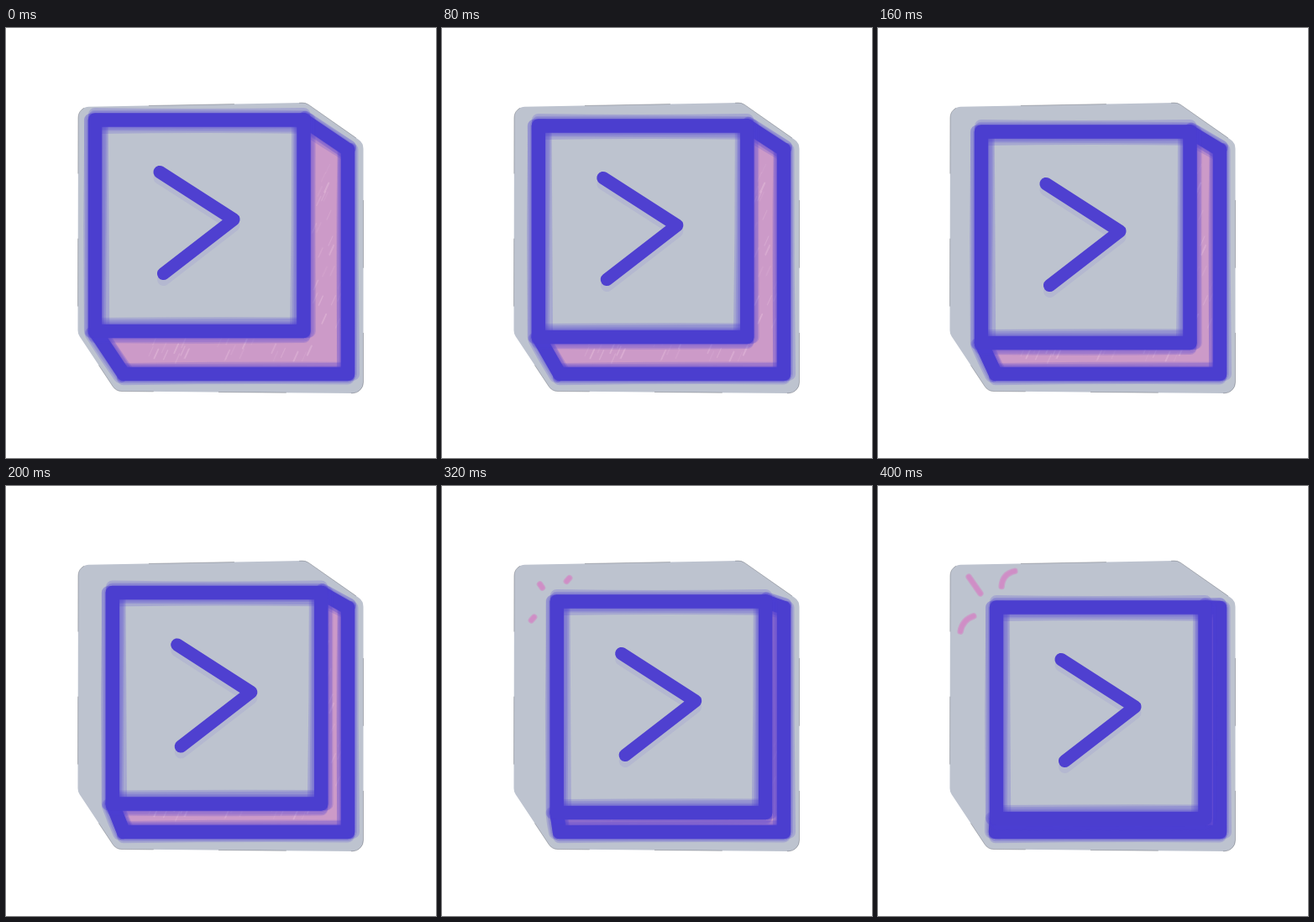
These frames come from a looping animation (512x512 px, 840 ms). An HTML page with a canvas:

```html
<!DOCTYPE html>
<html lang="en">
<head>
<meta charset="utf-8">
<title>Pressed key</title>
<style>
html, body { margin: 0; width: 100%; height: 100%; overflow: hidden; background: #fff; }
canvas { display: block; width: 512px; height: 512px; }
</style>
</head>
<body>
<canvas id="stage" width="512" height="512"></canvas>
<script>
const ctx = document.getElementById('stage').getContext('2d');
const LOOP = 840, STEP = 40, STEPS = 10, TRAVEL = 35;
const INK = '#4b3ecf', GREY = '#bdc3cf', PINK = '#cc9ac8', SPARK = '#d287c5';
const PEN = 16.5;

function seeded(seed) {
  return () => {
    seed = (seed * 16807) % 2147483647;
    return seed / 2147483647;
  };
}

function trace(points, closed) {
  ctx.beginPath();
  points.forEach(p => ctx.lineTo(...p));
  if (closed) ctx.closePath();
}

function traceRounded(points, radius) {
  const [a, b] = points;
  ctx.beginPath();
  ctx.moveTo((a[0] + b[0]) / 2, (a[1] + b[1]) / 2);
  points.forEach((_, i) => {
    const corner = points[(i + 1) % points.length];
    const next = points[(i + 2) % points.length];
    ctx.arcTo(...corner, ...next, radius);
  });
  ctx.closePath();
}

function stroke(color, width, alpha = 1) {
  ctx.globalAlpha = alpha;
  ctx.strokeStyle = color;
  ctx.lineWidth = width;
  ctx.stroke();
  ctx.globalAlpha = 1;
}

function fill(color) {
  ctx.fillStyle = color;
  ctx.fill();
}

// Translucent, uneven brush passes spread across an edge
function feather(a, b, outer, inner, rnd) {
  const dx = b[0] - a[0], dy = b[1] - a[1], len = Math.hypot(dx, dy) || 1;
  const nx = -dy / len, ny = dx / len;
  const passes = 8;
  for (let i = 0; i < passes; i++) {
    const side = outer + (inner - outer) * i / (passes - 1);
    const [from, bow, to] = [0, 1, 2].map(() => side * (0.7 + rnd() * 0.5));
    ctx.beginPath();
    ctx.moveTo(a[0] + nx * from, a[1] + ny * from);
    ctx.quadraticCurveTo((a[0] + b[0]) / 2 + nx * bow, (a[1] + b[1]) / 2 + ny * bow,
      b[0] + nx * to, b[1] + ny * to);
    stroke(INK, 16, 0.2);
  }
}

function drawBase() {
  traceRounded([[86, 94], [357, 89], [425.5, 137], [425.5, 435], [131, 432.5], [85.5, 364]], 13);
  fill(GREY);
  ctx.setLineDash([80, 78]);
  ctx.lineDashOffset = 30;
  stroke('#30343c', 0.6, 0.5);
  ctx.setLineDash([]);
}

function drawPink(side) {
  trace(side, true);
  fill(PINK);
  ctx.save();
  ctx.clip();
  const rnd = seeded(73);
  for (let i = 0; i < 50; i++) {
    const right = i % 2;
    const x = right ? 364 + rnd() * 32 : 170 + rnd() * 190;
    const y = right ? 170 + rnd() * 190 : 376 + rnd() * 24;
    trace([[x, y], [x + 5, y - 11]]);
    stroke('#e3bbd9', 1 + rnd(), 0.15 + 0.4 * rnd() ** 2);
  }
  ctx.restore();
}

function drawKey(px, py) {
  const at = (x, y) => [x + px, y + py];
  const face = [at(106, 109.5), at(354.5, 109.5), at(354.5, 361), at(106, 361)];
  const back = [face[1], [407, 145], [407, 412], [140, 412], face[3]];
  const rnd = seeded(511);

  drawPink([...back, face[2]]);
  back.slice(1).forEach((p, i) => feather(back[i], p, -5, 6, rnd));
  trace(back);
  stroke(INK, PEN);

  trace(face, true);
  fill(GREY);
  face.forEach((p, i) => feather(p, face[(i + 1) % 4], -6.5, 8, rnd));
  trace(face, true);
  stroke(INK, PEN);

  const chevron = drop => trace([at(183, 171.5 + drop), at(271, 228 + drop), at(187.5, 292.5 + drop)]);
  chevron(7);
  stroke('#b2b5d1', 15, 0.75);
  chevron(0);
  stroke('#4f40d0', 15.2);
}

// One dab that lengthens and bends as it flies out
function drawSpark(x, y, angle, bend, grow) {
  const half = 2.5 + 9.5 * grow;
  ctx.save();
  ctx.translate(x, y);
  ctx.rotate(angle);
  ctx.beginPath();
  ctx.moveTo(-half, 0);
  ctx.quadraticCurveTo(0, bend * grow, half, 0);
  stroke(SPARK, 7.5, 0.6);
  stroke(SPARK, 5, 0.7);
  ctx.restore();
}

function drawSparks(progress) {
  if (progress < 0.8) return;
  const grow = (progress - 0.8) / 0.2;
  drawSpark(118 - 3 * grow, 119 - grow, 0.96, 0, grow);
  drawSpark(150 + 5 * grow, 111.5 - grow, -0.86, -9, grow);
  drawSpark(108 - 2 * grow, 158 + 6 * grow, -0.86, -7, grow);
}

let start;
function frame(now) {
  start ??= now;
  const progress = Math.min(STEPS, Math.floor(((now - start) % LOOP) / STEP)) / STEPS;
  ctx.clearRect(0, 0, 512, 512);
  ctx.lineCap = ctx.lineJoin = 'round';
  drawBase();
  drawKey(TRAVEL * (1 - (1 - progress) ** 1.3), TRAVEL * progress);
  drawSparks(progress);
  requestAnimationFrame(frame);
}
requestAnimationFrame(frame);
</script>
</body>
</html>
```
